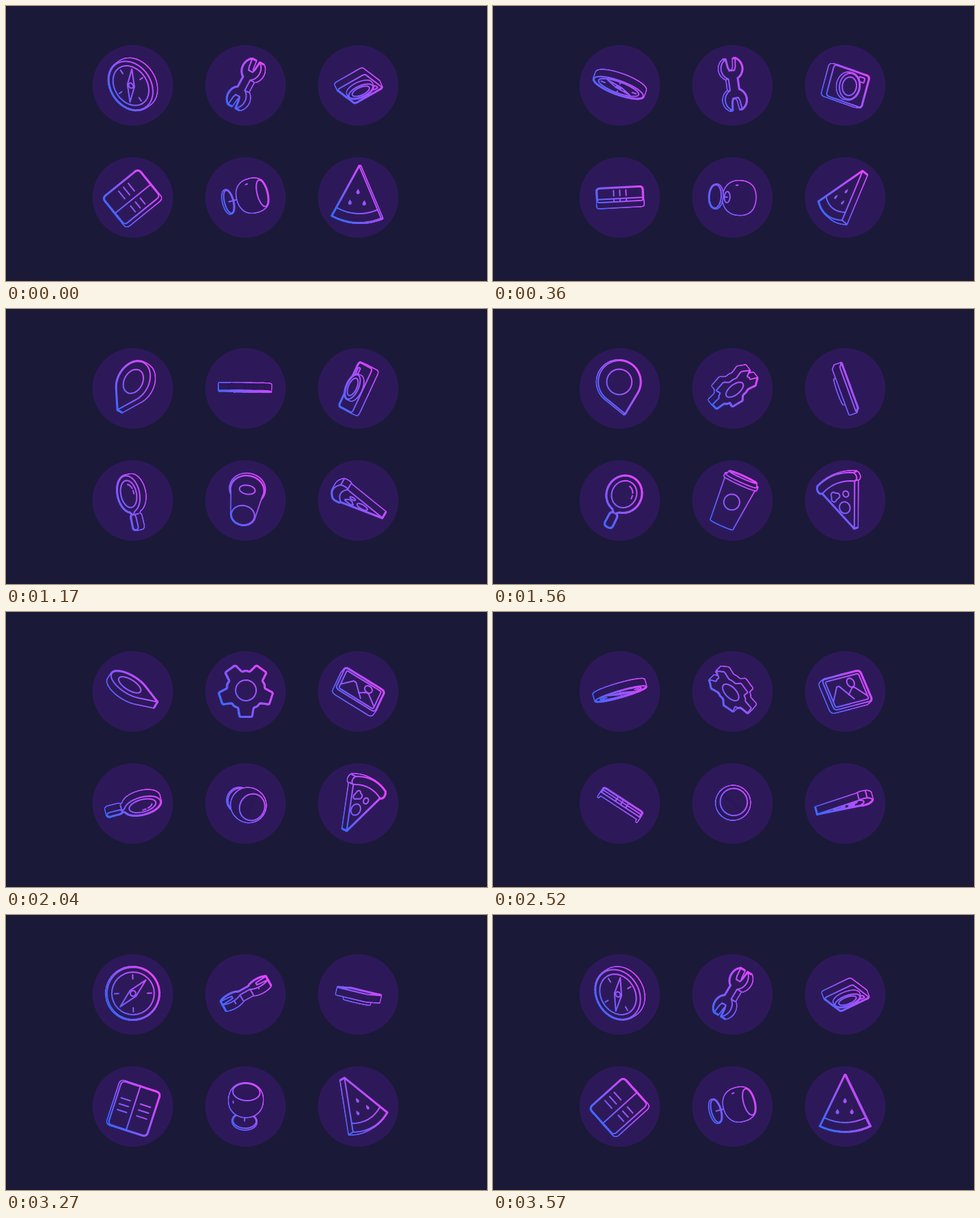
Animation, 700 px wide and 400 px high, one loop 3.6 s. Source, as an HTML page with a canvas:

```html
<!DOCTYPE html>
<html lang="en">
<head>
<meta charset="utf-8">
<title>Turning icons</title>
<style>
html, body { margin: 0; width: 100%; height: 100%; overflow: hidden; background: #1b1938; }
canvas { display: block; width: 700px; height: 400px; }
</style>
</head>
<body>
<canvas id="stage" width="700" height="400"></canvas>
<script>
const ctx = document.getElementById('stage').getContext('2d');
const LOOP = 3600, STEP = 30, LINE = 2;
const BACK = '#1b1938', DISC = '#2d195a';
const RAD = Math.PI / 180, TAU = Math.PI * 2;

// ---- path helpers: every path is a list of [x, y] ----
const range = n => [...Array(n).keys()];
const polar = (r, a) => [r * Math.cos(a), r * Math.sin(a)];
const turned = points => points.map(([x, y]) => [-x, -y]);

function arc(cx, cy, rx, ry, from = 0, to = 360, steps = 32) {
  const count = to - from === 360 ? steps : steps + 1;
  return range(count).map(i => {
    const a = (from + (to - from) * i / steps) * RAD;
    return [cx + rx * Math.cos(a), cy + ry * Math.sin(a)];
  });
}

const circle = (x, y, r, steps) => arc(x, y, r, r, 0, 360, steps);

function curve(p, c, q, steps = 8) {
  return range(steps + 1).map(i => {
    const t = i / steps, s = 1 - t;
    return [0, 1].map(k => s * s * p[k] + 2 * s * t * c[k] + t * t * q[k]);
  });
}

function toward(p, q, dist) {
  const f = Math.min(dist / Math.hypot(q[0] - p[0], q[1] - p[1]), 0.5);
  return [p[0] + (q[0] - p[0]) * f, p[1] + (q[1] - p[1]) * f];
}

const rounded = (points, r) => points.flatMap((p, i) =>
  curve(toward(p, points.at(i - 1), r), p, toward(p, points[(i + 1) % points.length], r), 5));

// Centred box; columns > 1 adds points along the long sides so that it can bend.
const box = (w, h, r, x = 0, y = 0) => rounded(
  [[-1, -1], [0, -1], [1, -1], [1, 1], [0, 1], [-1, 1]].map(([a, b]) => [x + a * w / 2, y + b * h / 2]), r);

// ---- icon faces ----
const compass = {
  outline: circle(0, 0, 38, 48),
  loops: [circle(0, 0, 31), range(4).map(i => polar(i % 2 ? 6 : 27, (i * 90 - 45) * RAD)), circle(0, 0, 4)],
  lines: range(4).map(i => [polar(21, i * TAU / 4), polar(27, i * TAU / 4)])
};

const pin = {
  outline: [[0, 39], ...arc(0, -8, 31, 31, 138, 402, 40)],
  loops: [circle(0, -8, 18.5)]
};

const jaw = [
  ...arc(23, 0, 16, 16, -155, -28, 12),
  [25, -6], [20, -4], [20, 4], [25, 6],
  ...arc(23, 0, 16, 16, 28, 155, 12)
];
const wrench = { outline: [...jaw, ...turned(jaw)] };

const gear = {
  outline: rounded(range(5).flatMap(i => {
    const a = i * TAU / 5 - 4 * RAD;
    return [polar(27, a - 0.41), polar(39, a - 0.22), polar(39, a + 0.22), polar(27, a + 0.41), polar(28, a + 0.63)];
  }), 2),
  loops: [circle(0, 0, 15)]
};

const camera = {
  outline: box(70, 47, 5),
  loops: [box(11, 7, 2, 22.5, -15.5)],
  lens: [circle(-1, 0, 19), circle(-1, 0, 13.5)]
};

const picture = {
  outline: box(67, 49, 6),
  loops: [box(59, 41, 3), arc(-11, 10, 6, 7)],
  lines: [[[-29, 11], [-14, -9], [-10, -9], [6, 15]], [[0, 7], [10, -2], [14, -2], [29, 15]]].map(turned)
};

const book = {
  depth: 8,
  bend: x => 0.2 * Math.abs(x) - 3,
  outline: box(60, 66, 6),
  lines: [
    [[0, -33], [0, 33]],
    ...[-9, 0, 9].flatMap(y => [[[-23, y], [-8, y]], [[8, y], [23, y]]])
  ]
};

const mirror = {
  outline: [
    ...arc(0, 13, 25, 27, -77, 257, 40),
    ...rounded([[-5.5, -18], [-6, -40], [6, -40], [5.5, -18]], 5)
  ],
  loops: [arc(0, 13, 18, 20)],
  lines: [arc(0, 13, 12, 14, 100, 150, 8), arc(0, 13, 12, 14, 165, 185, 4)]
};

const drop = (x, y) => [[x, y - 5], ...arc(x, y, 2.6, 2.8, -30, 210, 10)];
const melon = {
  outline: [[0, -45], ...curve([36, 29], [0, 45], [-36, 29], 12)],
  lines: [curve([30, 17], [0, 31], [-30, 17])],
  dots: [drop(0, -7), drop(-11, 9), drop(10, 9)]
};

const pizza = {
  outline: [
    [0, -43],
    ...curve([28, 21], [35, 22], [33, 30], 5),
    ...curve([31, 33], [0, 46], [-31, 33], 10),
    ...curve([-33, 30], [-35, 22], [-28, 21], 5)
  ],
  loops: [
    circle(2.5, -10, 8.5),
    circle(-7, 8, 4.5),
    [...arc(12, 13, 4, 4, 20, 150, 6), ...arc(7, 10, 4, 4, 90, 250, 6), [10, 5], ...arc(14, 7, 4, 4, -120, 40, 6)]
  ],
  lines: [curve([28, 21], [0, 33], [-28, 21])]
};

// ---- motion ----
// Each flat icon spins in the plane once per loop and tumbles once per loop.
// axis: local direction it leans along; skew: constant sideways lean;
// sway: slows the tumble near the edge-on and face-on poses;
// keep: how far past the edge the front shape stays.
const icons = [
  { x: 184.5, y: 114, front: compass, back: pin, spin: 146, spinDir: -1, tumble: 30, tumbleDir: 1, axis: 0 },
  { x: 349, y: 114, front: wrench, back: gear, spin: -62, spinDir: -1, tumble: -25, tumbleDir: 1, axis: 90 },
  { x: 513, y: 116, front: camera, back: picture, spin: 53, spinDir: -1, tumble: 60, tumbleDir: -1, axis: 50,
    skew: 0.55, sway: 0, keep: 0.12 },
  { x: 185, y: 281, front: book, back: mirror, spin: 51, spinDir: 1, tumble: -24, tumbleDir: -1, axis: 0, keep: 0.25 },
  { x: 512.5, y: 278, front: melon, back: pizza, spin: 3, spinDir: 1, tumble: -5, tumbleDir: -1, axis: 0 }
];

function pose({ spin, spinDir, tumble, tumbleDir, axis, skew = 0, sway = 12 }, t) {
  const turn = 360 * t / LOOP;
  const psi = (spin + spinDir * turn) * RAD;
  const raw = (tumble + tumbleDir * turn) * RAD;
  const theta = raw + sway * RAD * Math.sin(2 * raw);
  const dir = psi + axis * RAD, rest = Math.sqrt(1 - skew * skew);
  const [ax, ay] = polar(rest * Math.sin(theta), dir);
  const [bx, by] = polar(skew, dir - TAU / 4);
  return { psi, normal: [ax + bx, ay + by, rest * Math.cos(theta)] };
}

// Way from foot to rim of the glass and cup: a few poses, joined smoothly.
const vessel = {
  x: 348.5, y: 278.5, cupFrom: 390, cupTo: 1830,
  keys: [
    [0, 0.9, -0.23, 0.37], [780, -0.13, 0.16, -0.98], [1560, 0.41, -0.91, 0.08],
    [2040, 0.36, 0.2, 0.91], [2520, 0.07, -0.08, 0.99], [2970, -0.78, -0.54, 0.31]]
};

function along(keys, t) {
  const n = keys.length;
  const key = i => {
    const [ms, ...v] = keys[(i + n) % n];
    return [ms + LOOP * Math.floor(i / n), ...v];
  };
  let i = n - 1;
  while (keys[i][0] > t) i--;
  const [p, a, b, q] = [-1, 0, 1, 2].map(d => key(i + d));
  const span = b[0] - a[0], u = (t - a[0]) / span, u2 = u * u, u3 = u2 * u;
  const v = [1, 2, 3].map(k => {
    const ma = (b[k] - p[k]) / (b[0] - p[0]) * span;
    const mb = (q[k] - a[k]) / (q[0] - a[0]) * span;
    return (2 * u3 - 3 * u2 + 1) * a[k] + (u3 - 2 * u2 + u) * ma +
      (3 * u2 - 2 * u3) * b[k] + (u3 - u2) * mb;
  });
  const len = Math.hypot(...v) || 1;
  return v.map(c => c / len);
}

// ---- drawing ----
function trace(points, closed = true) {
  ctx.beginPath();
  points.forEach(p => ctx.lineTo(p[0], p[1]));
  if (closed) ctx.closePath();
}

function ink() {
  const g = ctx.createLinearGradient(-32, 22, 32, -22);
  g.addColorStop(0, '#3d69ff');
  g.addColorStop(0.5, '#9a55ff');
  g.addColorStop(1, '#e445ff');
  return g;
}

function stroke(points, closed, style, width = LINE) {
  trace(points, closed);
  ctx.strokeStyle = style;
  ctx.lineWidth = width;
  ctx.stroke();
}

function fill(points, style) {
  trace(points);
  ctx.fillStyle = style;
  ctx.fill();
}

// Outer contour of several overlapping shapes.
function silhouette(shapes, style) {
  shapes.forEach(s => stroke(s, true, style, 4));
  shapes.forEach(s => { fill(s, DISC); stroke(s, true, DISC, 0.6); });
}

// Slab between two copies of an outline; corner edges show where the side faces the viewer.
function slab(outline, top, bottom, style) {
  const next = i => (i + 1) % top.length;
  const area = top.reduce((sum, p, i) => sum + p[0] * top[next(i)][1] - top[next(i)][0] * p[1], 0);
  const dx = bottom[0][0] - top[0][0], dy = bottom[0][1] - top[0][1];
  const sides = top.map((p, i) => [p, top[next(i)], bottom[next(i)], bottom[i]]);
  const visible = sides.map(([p, q]) => ((q[1] - p[1]) * dx - (q[0] - p[0]) * dy) * Math.sign(area) > 0);
  silhouette([bottom, ...sides], style);
  outline.forEach((p, i) => {
    const a = outline.at(i - 1), b = outline[next(i)];
    const ux = p[0] - a[0], uy = p[1] - a[1], vx = b[0] - p[0], vy = b[1] - p[1];
    const bendAngle = Math.abs(Math.atan2(ux * vy - uy * vx, ux * vx + uy * vy));
    if (bendAngle > 0.5 && (visible.at(i - 1) || visible[i])) stroke([top[i], bottom[i]], false, style);
  });
  fill(top, DISC);
  stroke(top, true, style);
}

function drawFlat(icon, t, style) {
  const { psi, normal } = pose(icon, t);
  const isFront = normal[2] > -(icon.keep || 0);
  const face = isFront ? icon.front : icon.back;
  const [nx, ny, nz] = isFront ? normal : normal.map(c => -c);
  const cos = Math.cos(psi), sin = Math.sin(psi);
  const len = Math.hypot(nx, ny) || 1, fx = nx / len, fy = ny / len;
  const half = (face.depth || 10) / 2;
  const place = z => ([x, y]) => {
    const h = z + (face.bend ? face.bend(x) : 0);
    const px = x * cos - y * sin, py = x * sin + y * cos;
    const squash = (px * fx + py * fy) * (nz - 1);
    return [px + fx * squash + nx * h, py + fy * squash + ny * h];
  };
  const extrude = (outline, near, far) => slab(outline, outline.map(place(near)), outline.map(place(far)), style);

  if (nz < 0) {
    if (face.lens) extrude(face.lens[0], half, half + 5);
    extrude(face.outline, -half, half);
    return;
  }
  extrude(face.outline, half, -half);
  const { loops = [], lines = [], dots = [], lens } = face;
  loops.forEach(p => stroke(p.map(place(half)), true, style));
  lines.forEach(p => stroke(p.map(place(half)), false, style));
  dots.forEach(p => fill(p.map(place(half)), style));
  if (lens) {
    extrude(lens[0], half + 5, half);
    stroke(lens[1].map(place(half + 5)), true, style);
  }
}

function drawVessel(t, style) {
  const a = along(vessel.keys, t);
  const flatLen = Math.hypot(a[0], a[1]) || 1;
  const ux = a[0] / flatLen, uy = a[1] / flatLen;
  const ring = ([h, r]) => arc(0, 0, r * Math.abs(a[2]), r).map(([x, y]) =>
    [a[0] * h + ux * x - uy * y, a[1] * h + uy * x + ux * y]);
  const edge = ([h, r], side) => [a[0] * h - uy * r * side, a[1] * h + ux * r * side];
  const facing = a[2] >= 0;

  // Turned body with its near end drawn as a full ring.
  const body = profile => {
    const links = profile.slice(1).map((q, i) =>
      [edge(profile[i], 1), edge(q, 1), edge(q, -1), edge(profile[i], -1)]);
    silhouette([...profile.map(ring), ...links], style);
    stroke(ring(facing ? profile.at(-1) : profile[0]), true, style);
  };
  const stack = parts => (facing ? parts : parts.reverse()).forEach(part => part());

  if (t >= vessel.cupFrom && t < vessel.cupTo) {
    stack([
      () => { body([[-38, 17], [28, 23]]); drawSticker(a, style); },
      () => body([[28, 25], [32, 25]]),
      () => body([[32, 23], [37, 21]])
    ]);
    return;
  }
  const bowl = range(19).map(i => {
    const h = -9 + i * 2, u = Math.abs(h - 12) / 21.5;
    return [h, 24 * Math.max(0, 1 - u ** 2.6) ** (1 / 2.6)];
  });
  stack([
    () => body([[-29, 17], [-27, 17]]),
    () => stroke([-27, -9].map(h => [a[0] * h, a[1] * h]), false, style),
    () => {
      body(bowl);
      if (flatLen > 0.6) stroke([edge([5, 18], -1), edge([8, 18.5], -1)], false, style);
    }
  ]);
}

// Round label on the side of the cup that faces the viewer.
function drawSticker(a, style) {
  const raw = [-a[0] * a[2], -a[1] * a[2], 1 - a[2] * a[2]];
  const len = Math.hypot(...raw) || 1;
  const m = raw.map(c => c / len);
  const w = [a[1] * m[2] - a[2] * m[1], a[2] * m[0] - a[0] * m[2]];
  stroke(circle(0, 0, 11.5).map(([p, q]) =>
    [0, 1].map(k => a[k] * (p - 1) + m[k] * 20 + w[k] * q)), true, style);
}

function render(t) {
  ctx.fillStyle = BACK;
  ctx.fillRect(0, 0, 700, 400);
  for (const x of [184.5, 348.5, 512.5]) {
    for (const y of [115.5, 278.5]) fill(circle(x, y, 58.5, 120), DISC);
  }
  ctx.lineJoin = ctx.lineCap = 'round';
  const style = ink();
  const at = (item, draw) => {
    ctx.save();
    ctx.translate(item.x, item.y);
    draw(item);
    ctx.restore();
  };
  icons.forEach(icon => at(icon, () => drawFlat(icon, t, style)));
  at(vessel, () => drawVessel(t, style));
}

const start = performance.now();
function tick() {
  const t = (performance.now() - start) % LOOP;
  render(Math.floor(t / STEP) * STEP);
  requestAnimationFrame(tick);
}
tick();
</script>
</body>
</html>
```
